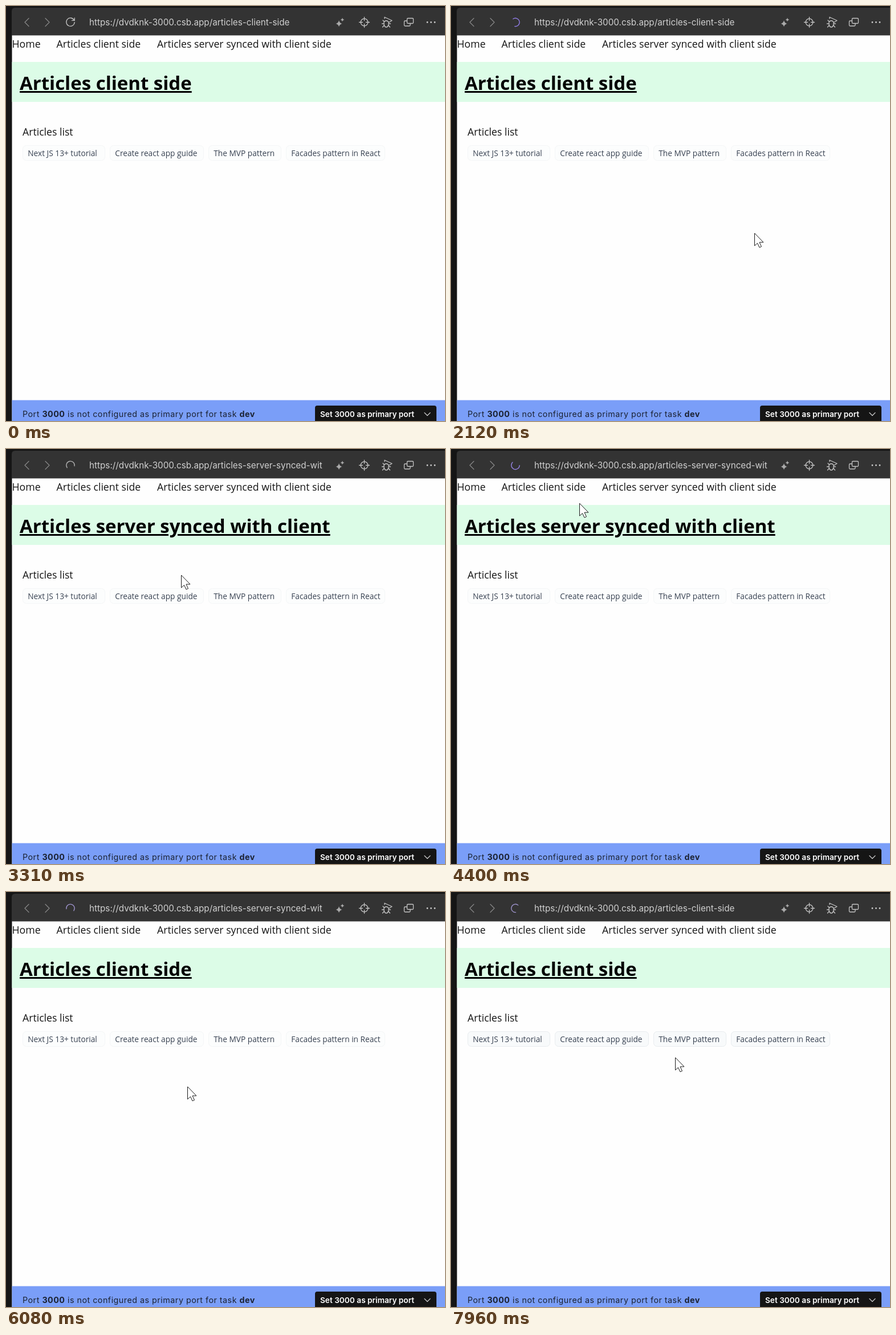
Recreate the animation shown at these times as an HTML page. Size 770 by 727 pixels, loop 8 s.

```html
<!DOCTYPE html>
<html lang="en">
<head>
<meta charset="utf-8">
<title>Articles</title>
<style>
html, body { margin: 0; width: 100%; height: 100%; overflow: hidden; background: #fff; }
svg { display: block; width: 770px; height: 727px; }
.page { font-family: "Open Sans", "Noto Sans", sans-serif; font-size: 17.7px; fill: #151515; }
.ui { font-family: Inter, Roboto, sans-serif; }
.chip text { font-size: 13.7px; font-weight: 500; fill: #374151; stroke: none; }
.line { fill: none; stroke: #c4c4c4; stroke-width: 1.3; stroke-linecap: round; stroke-linejoin: round; }
h1 { margin: 0; font: 700 33px/40px "Open Sans", "Noto Sans", sans-serif; color: #000; white-space: nowrap;
  text-decoration: underline; text-decoration-thickness: 2.5px; text-underline-offset: 2px; }
</style>
</head>
<body>
<svg viewBox="0 0 770 727">
  <rect width="770" height="727" fill="#151515"/>
  <path d="M10 52V9q0-6 6-6H770V52Z" fill="#333"/>
  <rect x="10.5" y="51.5" width="760" height="676" fill="#fefefe"/>

  <g class="line">
    <path d="M40 21.5 33 28.5 40 35.5M69 21.5 76 28.5 69 35.5" stroke="#858585"/>
    <path id="reload" d="M119.5 25A7.2 7.2 0 1 0 120.2 28.5M120.2 20.8V25.4H115.6"/>
    <path id="spinner" d="M-7.2 0A7.2 7.2 0 1 1 5 5.2"/>
    <circle cx="628.5" cy="28.5" r="6.3"/>
    <path d="M628.5 19.5V25.5M628.5 31.5V37.5M619.5 28.5H625.5M631.5 28.5H637.5"/>
    <path d="M663 28Q667 23.500 671 28V32Q670 37 667 37T663 32ZM663 31H659.500M671 31H674.500M663 34 660.500 37M671 34 673.500 37M663.500 27.500 661 25M664 22V19.500L677 25.500 672 28.500"/>
    <rect x="703.5" y="21.5" width="11" height="9" rx="1.5"/>
    <path d="M703 26H700Q698.5 26 698.5 27.5V33.5Q698.5 35 700 35H707.5Q709 35 709 33.5V31"/>
  </g>
  <path fill="#aaa" d="M584 25Q585 30 589.500 31 585 32 584 36.500 583 32 578.500 31 583 30 584 25ZM590 20.500Q590.500 23.500 593.500 24 590.500 24.500 590 27.500 589.500 24.500 586.500 24 589.500 23.500 590 20.500Z"/>
  <path d="M739 28.5h0M745.5 28.5h0M752 28.5h0" stroke="#ccc" stroke-width="2.8" stroke-linecap="round"/>
  <text id="url" class="ui" x="146" y="34" font-size="15.25" fill="#d0d0d0"></text>

  <g class="page">
    <text x="10.5" y="73">Home</text>
    <text x="88.5" y="73">Articles client side</text>
    <text x="265" y="73">Articles server synced with client side</text>
    <rect x="10.5" y="98" width="760" height="70" fill="#dcfce7"/>
    <foreignObject x="24" y="115" width="700" height="52"><h1 id="title"></h1></foreignObject>
    <text x="29" y="227">Articles list</text>
    <g id="chips"></g>
  </g>

  <g class="ui">
    <rect x="10.5" y="690.5" width="760" height="37" fill="#7a9ef8"/>
    <text x="29" y="720" font-size="14.3" letter-spacing=".49" fill="#1c2333">Port <tspan font-weight="700">3000</tspan> is not configured as primary port for task <tspan font-weight="700">dev</tspan></text>
    <path d="M542 727V704q0-4 4-4H751q4 0 4 4V727Z" fill="#151515"/>
    <text x="551" y="719.5" font-size="13.65" font-weight="600" fill="#fff">Set 3000 as primary port</text>
    <path class="line" d="M734 712.5 739 717.5 744 712.5"/>
  </g>

  <g id="cursor" fill="#fff" stroke="#1a1a1a" stroke-linejoin="round">
    <path id="arrow" d="M.5 0V22L5.5 17.5 9 25 12.500 23.5 9 16H16Z"/>
    <path id="hand" d="M-2 13V2Q-2 0 0 0T2 2V9Q4 7.5 6 9.5 8 8.5 9.5 10.5 12.5 9.5 13 12V18Q12 21 10.5 25H0Q-3 20 -7 15 -7 12 -4 13L-2 15Z"/>
    <path id="beam" d="M-4-9H4M0-9V9M-4 9H4" fill="none" stroke="#333"/>
  </g>
</svg>
<script>
const LOOP = 8000;
const $ = id => document.getElementById(id);
const clamp = v => Math.max(0, Math.min(1, v));
const within = (t, [from, to]) => t >= from && t < to;
const show = (id, on) => $(id).setAttribute('visibility', on ? 'visible' : 'hidden');
const write = (id, text) => { if ($(id).textContent !== text) $(id).textContent = text; };

const labels = ['Next JS 13+ tutorial', 'Create react app guide', 'The MVP pattern', 'Facades pattern in React'];
const edges = [29, 182, 355, 491, 673];
$('chips').innerHTML = labels.map((label, i) =>
  `<g class="chip"><rect x="${edges[i] + .5}" y="244.5" width="${edges[i + 1] - edges[i] - 9}" height="26" rx="6"/>` +
  `<text x="${edges[i] + 9.3}" y="263">${label}</text></g>`).join('');

// Pointer stops: arrival, x, y and how long it rests
const STOPS = [
  [130, 697, 636], [620, 275, 165], [1110, 449, 79], [1240, 446, 66, 260],
  [1800, 532, 398, 660], [3310, 307, 221], [3380, 355, 198], [3700, 214, 66, 600],
  [4800, 318, 341, 1350], [6580, 96, 200], [6860, 312, 96], [7000, 343, 66, 430],
  [7800, 393, 290]
];
const LOADS = [[1780, 3560], [4130, 6450], [7800, 8400]];
const SPIN = 680;

function pointer(t) {
  const next = STOPS.findIndex(s => s[0] > t);
  const [at, x, y, rest = 0] = STOPS.at(next < 0 ? -1 : Math.max(0, next - 1));
  if (next < 1) return [x, y];
  const [end, toX, toY] = STOPS[next];
  const u = clamp((t - at - rest) / (end - at - rest));
  const ease = u * u * (3 - 2 * u);
  return [x + (toX - x) * ease, y + (toY - y) * ease];
}

function drawCursor(t) {
  const [x, y] = pointer(t);
  const active = t >= STOPS[0][0];
  const link = y < 77;
  const text = within(x, [24, 325]) && within(y, [117, 152]);
  $('cursor').setAttribute('transform', `translate(${x} ${y})`);
  show('arrow', active && !link && !text);
  show('hand', active && link);
  show('beam', active && text);
}

function drawLoading(t) {
  const load = LOADS.find(l => within(t, l));
  show('reload', !load);
  show('spinner', load);
  if (!load) return;
  // Grey turns purple at the start and back at the end
  const tint = Math.min(clamp((t - load[0]) / 300), clamp((load[1] - 260 - t) / 200));
  const mix = (from, to) => Math.round(from + (to - from) * tint);
  $('spinner').style.stroke = `rgb(${mix(175, 145)},${mix(175, 125)},${mix(175, 230)})`;
  $('spinner').setAttribute('transform', `translate(113 28.5) rotate(${t / SPIN * 360 + 11})`);
}

function draw(t) {
  const fresh = t >= 6250;
  write('title', 'Articles ' + (within(t, [2450, 5300]) ? 'server synced with client' : 'client side'));
  write('url', 'https://dvdknk-3000.csb.app/articles-' + (within(t, [3150, 6250]) ? 'server-synced-wit' : 'client-side'));
  $('chips').setAttribute('fill', fresh ? '#f8fafb' : '#fcfdfd');
  $('chips').setAttribute('stroke', fresh ? '#e8ecef' : '#f4f6f7');
  drawLoading(t);
  drawCursor(t);
}

const began = performance.now();
function tick() {
  draw((performance.now() - began) % LOOP);
  requestAnimationFrame(tick);
}
tick();
</script>
</body>
</html>
```
